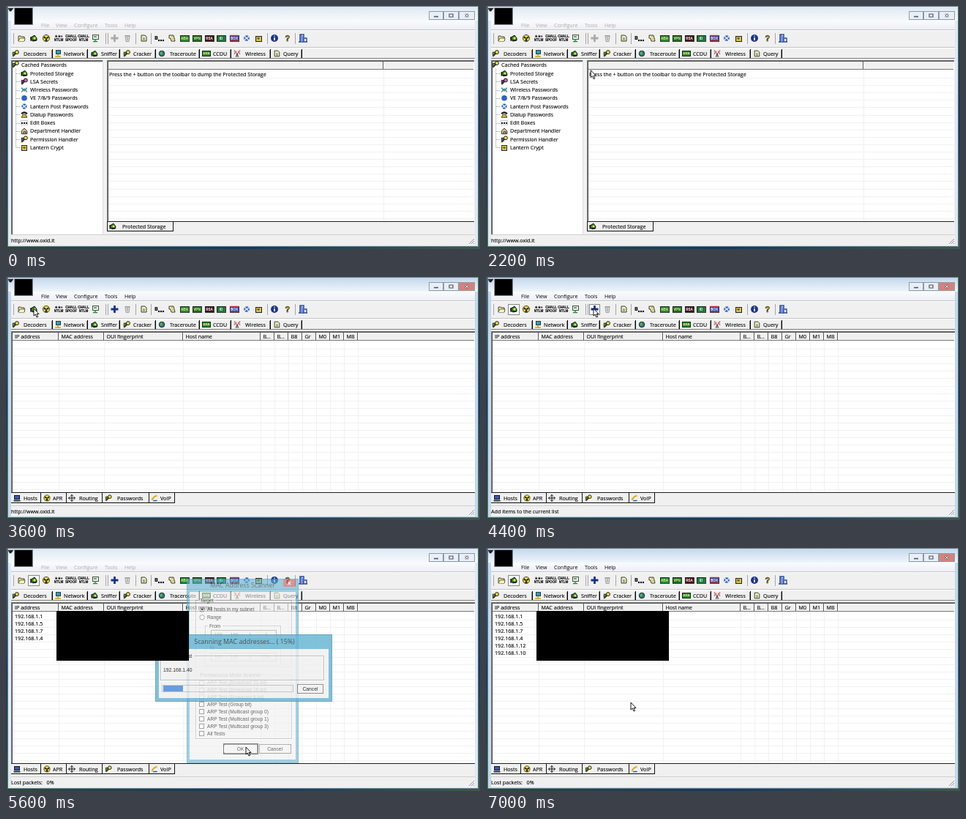
Write an HTML page that moves like this. It is 648 by 332 pixels and loops after 7.2 s.

```html
<!DOCTYPE html>
<html lang="en">
<head>
<meta charset="utf-8">
<title>Password tool</title>
<style>
html, body { margin: 0; width: 100%; height: 100%; overflow: hidden; background: #fff; }
svg { display: block; width: 648px; height: 332px; }
text { font: 7.15px "Open Sans", sans-serif; fill: #000; stroke: #000; stroke-width: .12; white-space: pre; }
.d text { font: 6.75px "Liberation Sans", sans-serif; stroke: none; }
.d text.cap { font: 8.9px "Open Sans", sans-serif; fill: #1c2b36; }
text.tiny { font: bold 4.6px "Liberation Sans", sans-serif; }
#menu text { fill: inherit; stroke: none; }
rect, .line { shape-rendering: crispEdges; }
</style>
</head>
<body>
<svg id="stage" viewBox="0 0 648 332"></svg>
<script>
const STEP = 200, LOOP = 7200;

// Drawing helpers: each returns SVG markup
const box = (x, y, w, h, fill, more = '') => `<rect x="${x}" y="${y}" width="${w}" height="${h}" fill="${fill}" ${more}/>`;
const frame = (x, y, w, h, color, fill = 'none') => box(x + .5, y + .5, w - 1, h - 1, fill, `stroke="${color}"`);
const path = (d, color, width = 1, fill = 'none') => `<path d="${d}" stroke="${color}" stroke-width="${width}" fill="${fill}"/>`;
const line = (d, color, more = '') => `<path class="line" d="${d}" stroke="${color}" fill="none" ${more}/>`;
const dot = (r, fill, x = 0, y = 0, more = '') => `<circle cx="${x}" cy="${y}" r="${r}" fill="${fill}" ${more}/>`;
const text = (x, mid, s, more = '') => `<text x="${x}" y="${mid + 2.6}" ${more}>${s}</text>`;
const group = (id, body, more = '') => `<g id="${id}" ${more}>${body}</g>`;
const seq = (n, fn) => Array.from({ length: n }, (_, i) => fn(i)).join('');
const fade = (id, stops, x2 = 0) => `<linearGradient id="${id}" x1="0" y1="0" x2="${x2}" y2="1">` +
  stops.map((c, i) => `<stop offset="${i / (stops.length - 1)}" stop-color="${c}"/>`).join('') + '</linearGradient>';
const sunken = (x, y, w, h) => box(x, y, w, h, '#fff') +
  line(`M${x} ${y + h}V${y + .5}H${x + w}`, '#777') + line(`M${x + 1.5} ${y + h}V${y + 1.5}H${x + w}`, '#555');

// Small icons centred on 0,0
const chip = (fill, label, color = '#e4f58a') => box(-6, -4, 12, 8, fill, 'stroke="#111" stroke-width=".8"') +
  `<text class="tiny" x="0" y="1.5" text-anchor="middle" style="fill:${color};stroke:none">${label}</text>`;
const words = (a, b) => `<g text-anchor="middle"><text class="tiny" y="-.6">${a}</text><text class="tiny" y="4.4">${b}</text></g>`;
const page = (fill, mark) => path('M-3 -4H2L4 -2V4H-3Z', '#222', .9, fill) + path('M-1 0H2M-1 2H2', mark, 1.1);
const key = (ring, tag) => path('M-4 4L1 -1', '#4a4000', 2.2) + dot(2.6, ring, 2, -2, 'stroke="#111" stroke-width="1"') +
  path('M-4 -2H-1V2H-4Z', '#222', .9, tag);
const icons = {
  folder: path('M-4 4V-3H-1L0 -2H4V4Z', '#333', .9, '#f4e48a') + path('M-4 4L-2 0H5L4 4', '#333', .7, '#fff6b8'),
  card: path('M-4 -1L1 -4L4 0V3L-1 4L-4 2Z', '#111', 1, '#27812f') + dot(1.7, '#f1e23c', 1, 0) + path('M-4 4V-2M-2 3H3', '#111', 1.2),
  nuke: dot(4.6, '#f0df28', 0, 0, 'stroke="#222" stroke-width=".8"') + path('M0 0L-3 -2.5V0ZM0 0L3 -2.5V0ZM0 0L-1.5 3.5H1.5Z', '#111', .5, '#111'),
  ntlm: words('★★+', 'NTLM'), chall: words('CHALL', 'SPOOF'), reset: words('CHALL', 'NTLM'),
  screen: box(-4, -5, 8, 6, '#e9f4e6', 'stroke="#222" stroke-width=".8"') + path('M0 1V4M-3 4.5H3M-2 -2H2', '#2c8a36', 1.4),
  plus: path('M0 -5V5M-5 0H5', 'currentColor', 2.8),
  bin: path('M-3 -3L-2 4.5H2L3 -3Z', '#999', .9, '#d8dcd8') + path('M-3.5 -3.5H3.5M0 -2V3', '#999', 1),
  doc: page('#f4f2c0', '#2f7d2a'), note: path('M-4 -4H2L4 4H-1L-2 0H-4Z', '#222', .9, '#fff3a8') + path('M-1 -2H1M0 1H2', '#a06d10', .9),
  base: `<text x="-6" y="2" style="font-weight:bold">B</text>` + dot(1.2, '#111', 0, 3) + dot(1.2, '#111', 3, 3) + dot(1.2, '#111', 6, 3),
  green: chip('#248a2d', 'ABA'), hash: chip('#176d1f', 'VPN'), red: chip('#401414', 'RSA', '#fff'),
  token: chip('#1f7a3b', 'ID', '#e0ffe0'), blue: chip('#2b48b5', 'BOX', '#fff') + path('M-6 -3.5H6M-6 3.5H6', '#c42b2b', 1.4),
  swirl: dot(3.8, '#2f62c8') + path('M-4 3L4 -3M-3 -3L3 3', '#e3efff', 1.4),
  lock: box(-4, -3, 8, 7, '#d9c340', 'stroke="#222"') + path('M-2 0H2M0 -1V2', '#443', 1),
  info: dot(5, '#1b3590') + path('M0 -1V3M0 -3.5V-2.2', '#fff', 1.6),
  help: `<text x="-2.5" y="4" style="font:bold 11px 'Liberation Sans',sans-serif;fill:#c9b010;stroke-width:.5">?</text>`,
  exit: path('M-4 5V-5H1V5M-6 5H6', '#24459f', 1.5) + path('M2 0H5V5', '#24459f', 1.3) + path('M-3 -4L0 -2V5H-3Z', '#24459f', .5, '#7fa4e8'),
  key: key('#f1dd42', '#5d9a3d'), secret: key('#c95fc0', '#7a2f94'), pass: key('#f1dd42', '#3a68c4'),
  globe: dot(4, '#1f6f86', 0, 0, 'stroke="#123" stroke-width=".9"') + path('M-3 -1L0 -3L1 0L-1 2ZM1 2L3 0', '#57b04b', .7, '#57b04b'),
  net: box(-3, -4.5, 7, 5, '#2f9fb8', 'stroke="#222" stroke-width=".9"') + path('M0 1V4M-4 4H4', '#c8ad1c', 1.8),
  house: path('M-4 0L0 -4L4 0V4H-4Z', '#222', 1, '#d8c890') + path('M-1 4V1H2V4', '#222', 1),
  waves: path('M-4 -3Q0 0 -4 3M4 -3Q0 0 4 3', '#2a68c0', 1.3) + dot(2.2, '#3aa36a'),
  mast: path('M0 5V-1M-2 5L0 0L2 5', '#333', .9) + path('M-4 -5Q-2 -2 -4 1M4 -5Q2 -2 4 1M-2 -4Q-1 -2 -2 0M2 -4Q1 -2 2 0', '#c42828', .9),
  ball: dot(4, '#2c5fca'),
  edit: box(-5, -3, 10, 6, '#fff', 'stroke="#aaa" stroke-width=".6"') + seq(3, i => box(i * 3 - 4, -1, 2, 2, '#111')),
  arrows: path('M0 -5V5M-5 0H5M-2 -3L0 -5L2 -3M-2 3L0 5L2 3M-3 -2L-5 0L-3 2M3 -2L5 0L3 2', '#111', 1.1),
  host: box(-4, -4, 8, 6, '#345ab8', 'stroke="#111"') + path('M-5 4H5', '#222', 2),
  phone: path('M-4 -1Q0 -5 4 -1', '#222', 2.6) + path('M-4 4L-2 0H2L4 4Z', '#222', .9, '#e2c52c'),
  voice: path('M-4 3Q0 -4 4 -3', '#d8b41c', 2.4) + path('M-2 4H4', '#2b62b5', 1.8),
};
const icon = (name, x, y, size = 1) => `<g transform="translate(${x} ${y}) scale(${size})">${icons[name]}</g>`;

function windowChrome() {
  const tools = [['folder', 21], ['card', 38], ['nuke', 55], ['ntlm', 72], ['chall', 89], ['reset', 106], ['screen', 122],
    ['bin', 166], ['doc', 188], ['base', 209], ['note', 227], ['green', 244], ['hash', 261], ['red', 278], ['token', 294],
    ['blue', 312], ['swirl', 329], ['lock', 345], ['info', 367], ['help', 384], ['exit', 406]];
  const menus = [['File', 48], ['View', 68], ['Configure', 93], ['Tools', 135], ['Help', 162]];
  return box(0, 0, 648, 332, 'url(#desk)') + box(2, 1, 644, 328, '#dfe9f3', 'id="glass"') +
    box(3, 1, 642, 19, 'url(#sheen)') + frame(2, 0, 644, 329, '#6b7c8b') +
    box(7, 20, 634, 307, '#f0f0f0') + box(7, 20, 634, 12, 'url(#strip)') +
    path('M3 3H10L7 7H5Z', '#222', .5, '#222') + frame(11, 2, 26, 24, '#8b9299', '#000') +
    frame(578, 7, 20, 12, '#8c9aa8', '#e8eff6') + frame(598, 7, 21, 12, '#8c9aa8', '#e8eff6') +
    box(619.5, 7.5, 21, 11, '#e8eff6', 'id="close" stroke="#8c9aa8"') +
    path('M585 14.5H591', '#556', 1.6) + path('M606 11H611V15H606Z', '#556', 1.2) +
    path('M628 11L632 15M632 11L628 15', '#556', 2) + path('M628 11L632 15M632 11L628 15', '#fff', .9) +
    group('menu', menus.map(([s, x]) => text(x, 26, s)).join('')) +
    line('M7 32.5H641M7 56.5H641', '#c4c4c4') + line('M7 33.5H641M7 57.5H641', '#fff') +
    line('M10.5 37V52M136.5 37V52M139.5 37V52M177.5 37V52M198.5 37V52M357.5 37V52M395.5 37V52', '#a5a5a5') +
    group('pressed', frame(30, 37, 16, 15, '#888', '#fff')) + group('hover', frame(141, 37, 15, 15, '#888', '#fafafa')) +
    tools.map(([n, x]) => icon(n, x, 44)).join('') + group('add', icon('plus', 148.5, 44)) +
    line('M7 312.5H641', '#d0d0d0') + seq(3, i => path(`M${639 - i * 3} 325L640 ${324 - i * 3}`, '#999')) +
    `<text id="status" x="7" y="322.6"></text>`;
}

function topTabs() {
  const tabs = [['Decoders', 24, 'key', 13, 63], ['Network', 79, 'net', 71, 111], ['Sniffer', 130, 'card', 121, 155],
    ['Cracker', 174, 'key', 165, 204], ['Traceroute', 224, 'globe', 213, 264], ['CCDU', 283, 'green', 274, 307],
    ['Wireless', 327, 'mast', 316, 361], ['Query', 379, 'doc', 370, 404]];
  return line('M7 71.5H641', '#777') + line('M7 72.5H641', '#fff') +
    tabs.map(([s, x, n, ix, end]) => text(x, 65, s) + icon(n, ix, 65, .95) +
      line(`M${end - .5} 60V71`, '#888') + line(`M${end + .5} 59V71`, '#000')).join('') +
    line('M7 58.5H404', '#fff');
}

function grid(x, w, cols) {
  const bottom = 294;
  return sunken(x, 74, w, bottom - 74) +
    line(seq(20, i => `M${x + 2} ${Math.round(98 + i * 10.1) + .5}h${w - 3}`), '#f1f1f1') +
    line(cols.map(c => `M${c + .5} 87V${bottom}`).join(''), '#f1f1f1') +
    box(x + 2, 76, w - 3, 10, '#f0f0f0') + line(`M${x + 2} 86.5H${x + w - 1}`, '#777') +
    line(cols.map(c => `M${c - .5} 76V86`).join(''), '#555') + line(cols.map(c => `M${c + .5} 76V86`).join(''), '#fff') +
    line(`M${x} ${bottom + .5}H${x + w}`, '#222');
}

function decoders() {
  const items = [['Protected Storage', 'card'], ['LSA Secrets', 'secret'], ['Wireless Passwords', 'waves'], ['VE 7/8/9 Passwords', 'ball'],
    ['Lantern Post Passwords', 'swirl'], ['Dialup Passwords', 'phone'], ['Edit Boxes', 'edit'],
    ['Department Handler', 'house'], ['Permission Handler', 'pass'], ['Lantern Crypt', 'lock']];
  const row = i => 92 + i * 11.27;
  return sunken(7, 74, 125, 238) + line('M132.5 74V312', '#ddd') + line('M13.5 86V193', '#999', 'stroke-dasharray="1 1"') +
    icon('key', 13, 80, .95) + text(21, 80.5, 'Cached Passwords') +
    items.map(([s, n], i) => line(`M14 ${Math.round(row(i)) + .5}H20`, '#999', 'stroke-dasharray="1 1"') +
      icon(n, 25, row(i), .95) + text(33, row(i), s)).join('') +
    grid(138, 502, [516]) + text(141, 93, 'Press the + button on the toolbar to dump the Protected Storage') +
    line('M138.5 295V307.5H228.5V295', '#111') + icon('card', 146, 301, .95) + text(159, 301, 'Protected Storage');
}

function sniffer() {
  const heads = ['IP address', 'MAC address', 'OUI fingerprint', 'Host name', 'B...', 'B...', 'B8', 'Gr', 'M0', 'M1', 'MB'];
  const cols = [72, 134, 242, 348, 367, 386, 405, 424, 443, 462, 481];
  const tabs = [['Hosts', 24, 'host', 15, 47], ['APR', 64, 'nuke', 56, 82], ['Routing', 100, 'arrows', 90, 131],
    ['Passwords', 152, 'key', 140, 195], ['VoIP', 211, 'voice', 203, 230]];
  return grid(7, 634, cols) + heads.map((s, i) => text(i ? cols[i - 1] + 3.5 : 12, 81.3, s)).join('') +
    [1, 5, 7, 4, 12, 10].map((n, i) => text(12, 93 + i * 10.1, '192.168.1.' + n, 'class="ip"')).join('') +
    line('M7 308.5H230', '#111') + tabs.map(([s, x, n, ix, end]) => text(x, 302, s) + icon(n, ix, 302, .9) + line(`M${end + .5} 295V309`, '#111')).join('');
}

const panel = (x, y, w, h, cap) => box(x, y, w, h, '#62b3d3') + frame(x, y, w, h, '#4a94b3') + box(x + 5, y + cap, w - 10, h - cap - 5, '#f0f0f0');
const fieldset = (x, y, w, h, label, lw) => frame(x + 1, y + 1, w, h, '#fff') + frame(x, y, w, h, '#b0b0b0') + box(x + 4, y - 2, lw, 5, '#f0f0f0') + text(x + 6, y, label);
const button = (x, y, w, h, s) => frame(x, y, w, h, '#777', '#f0f0f0') + line(`M${x + 1.5} ${y + h - 2}V${y + 1.5}H${x + w - 2}`, '#fff') +
  text(x + w / 2, y + h / 2, s, 'text-anchor="middle"');

function scannerDialog() {
  const tests = ['Broadcast 31-bit', 'Broadcast 16-bit', 'Broadcast 8-bit', 'Group bit', 'Multicast group 0', 'Multicast group 1', 'Multicast group 3'];
  const labels = [...tests.map(s => `ARP Test (${s})`), 'All Tests'];
  const radio = y => dot(3.3, '#fff', 267, y, 'stroke="#666" stroke-width=".9"');
  const address = (y, last) => frame(279, y - 6, 92, 13, '#999', '#f0f0f0') +
    [192, 168, 1, last].map((n, i) => text(289.5 + i * 22.3, y, n, 'text-anchor="middle" style="fill:#888"') +
      (i < 3 ? text(301 + i * 22.3, y, '.', 'text-anchor="middle" style="fill:#888"') : '')).join('');
  return panel(245, 37, 157, 257, 19) + text(278, 46.5, 'MAC Address Scanner', 'class="cap"') +
    box(380, 38, 17, 11, '#cf5356') + path('M386.5 41.5L390.5 45.5M390.5 41.5L386.5 45.5', '#fff', 1.2) +
    fieldset(258, 67, 134, 94, 'Target', 24) + radio(80) + dot(1.5, '#111', 267, 80) + radio(91) +
    text(274, 80, 'All hosts in my subnet') + text(274, 91, 'Range') +
    fieldset(271, 103, 106, 25, 'From', 20) + address(115, 1) + fieldset(271, 134, 106, 25, 'To', 12) + address(146, 254) +
    fieldset(258, 171, 134, 90, 'Promiscuous-Mode Scanner', 86) +
    labels.map((s, i) => frame(263, Math.round(178.5 + i * 10.15), 7, 7, '#666', '#fff') + text(274, 182 + i * 10.15, s)).join('') +
    button(297, 268, 47, 13, 'OK') + frame(296, 267, 49, 15, '#222') + button(346, 268, 45, 13, 'Cancel');
}

function progressDialog() {
  return panel(204, 118, 242, 92, 20) + `<text id="progress" class="cap" x="326" y="131.2" text-anchor="middle"></text>` +
    fieldset(211, 147, 224, 34, 'Current host', 43) + `<text id="host" x="215" y="169.4"></text>` +
    frame(213, 187, 180, 10, '#bbb', '#f0f0f0') + box(215, 188, 0, 8, '#3f86d8', 'id="bar"') + button(398, 186, 36, 13, 'Cancel');
}

const stage = document.getElementById('stage');
stage.innerHTML = '<defs>' + fade('desk', ['#44606e', '#16425f', '#2a4a3a', '#143a60', '#3c5a4a'], 1) +
  fade('strip', ['#fafbfd', '#eceff6']) +
  '<linearGradient id="sheen" x1="0" y1="0" x2="0" y2="1"><stop offset="0" stop-color="#fff" stop-opacity="0"/><stop offset="1" stop-color="#fff" stop-opacity=".75"/></linearGradient></defs>' +
  windowChrome() + topTabs() + group('decoders', decoders()) + group('sniffer', sniffer()) +
  group('dialog', scannerDialog(), 'class="d"') + group('scan', progressDialog(), 'class="d"') +
  group('redact', box(69, 86, 181, 68, '#000')) +
  group('pointer', path('M0 0V10L2.3 8L4 12L5.7 11.2L4 7.5H7Z', '#000', .9, '#fff'));

const el = Object.fromEntries([...stage.querySelectorAll('[id]')].map(e => [e.id, e]));
const ips = stage.querySelectorAll('.ip');
const show = (node, on) => { node.style.display = on ? '' : 'none'; };

// Pointer stops: step, x, y
const stops = [[4, 262, 326], [6, 243, 299], [7, 240, 292], [12, 132, 64], [14, 132, 63], [15, 120, 59], [18, 38, 43], [19, 39, 43],
  [22, 147, 43], [24, 332, 182], [26, 327, 271], [28, 328, 272], [29, 324, 270], [34, 198, 211], [35, 198, 211]];
const hosts = { 28: 40, 29: 115, 30: 191, 31: 250 };

function pointerAt(k) {
  const i = Math.max(1, stops.findIndex(s => s[0] >= k));
  const [a, ax, ay] = stops[i - 1], [b, bx, by] = stops[i];
  const u = (k - a) / (b - a), e = u * u * (3 - 2 * u);
  return [ax + (bx - ax) * e, ay + (by - ay) * e];
}

function render(k) {
  const sniffing = k >= 13, found = k >= 28, host = hosts[k], fading = k === 28;
  const dialog = k >= 23 && k <= 28, active = sniffing && !dialog && !host;
  show(el.decoders, !sniffing);
  show(el.sniffer, sniffing);
  show(el.pressed, k >= 19);
  show(el.hover, k === 22);
  show(el.dialog, dialog);
  show(el.scan, host);
  show(el.redact, found);
  ips.forEach((ip, i) => show(ip, found && (i < 4 || k >= 30)));
  el.menu.style.fill = active ? '#000' : '#acacac';
  el.glass.style.fill = active ? '#c3d8ec' : '#dfe9f3';
  el.close.style.fill = active ? '#d98078' : '#e8eff6';
  el.add.style.color = sniffing ? '#16318f' : '#a9a9a9';
  el.status.textContent = found ? 'Lost packets:   0%' : k === 22 ? 'Add items to the current list' : 'http://www.oxid.it';
  el.dialog.style.opacity = fading ? .6 : 1;
  el.dialog.setAttribute('transform', fading ? 'translate(323 274) scale(.98) translate(-323 -274)' : '');
  el.scan.style.opacity = fading ? .8 : 1;
  if (host) {
    const pct = Math.floor(host / 2.55);
    el.progress.textContent = `Scanning MAC addresses... ( ${pct}%)`;
    el.host.textContent = '192.168.1.' + host;
    el.bar.setAttribute('width', 1.77 * pct);
  }
  show(el.pointer, k >= 4);
  if (k >= 4) el.pointer.setAttribute('transform', `translate(${pointerAt(k)})`);
}

let last = -1;
function tick() {
  const k = Math.floor(performance.now() % LOOP / STEP);
  if (k !== last) render(last = k);
  requestAnimationFrame(tick);
}
tick();
</script>
</body>
</html>
```
